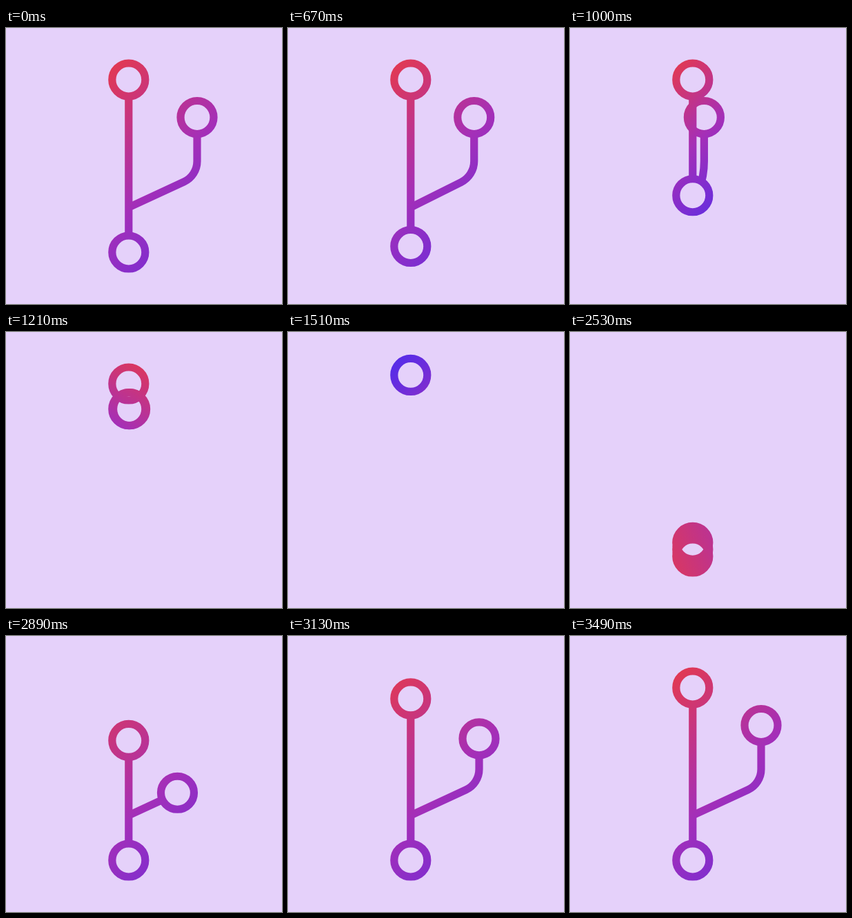
An HTML page with a canvas for the animation above (3520 ms loop, 400 px wide and 400 px high).

```html
<!DOCTYPE html>
<html lang="en">
<head>
<meta charset="utf-8">
<title>Branch loop</title>
<style>
  html, body { margin: 0; width: 100%; height: 100%; overflow: hidden; background: #e5d1fa; }
  canvas { display: block; width: 400px; height: 400px; }
</style>
</head>
<body>
<canvas id="stage" width="400" height="400"></canvas>
<script>
const LOOP = 3520, HOLD = 430, STEP = 30;
const X = 177.8, TOP = 75, BOTTOM = 325, RISE = 56;
const SIDE = { x: 277, y: 129.5 };
const JOINT = 260, CORNER = 214, BEND = 21, BEND_LENGTH = 38;
const R = 24, WIDTH = 11.2;
const BACKGROUND = '#e5d1fa';

// time, centre x, centre y, half length, angle in degrees
const GRADIENT = [
  [400, 240, 200, 170, 45],
  [670, 230, 190, 156, 45],
  [1000, 195, 155, 106, 45],
  [1500, 204, 164, 114, 225],
  [2050, 204, 164, 114, 225],
  [2800, 242, 202, 180, 405],
  [3490, 240, 200, 170, 405]
];

const canvas = document.getElementById('stage');
const ctx = canvas.getContext('2d');
const mix = (a, b, p) => a + (b - a) * p;
const clamp = v => Math.min(1, Math.max(0, v));

// Cubic bezier easing (.75, 0, .25, 1), solved by bisection.
function ease(u) {
  if (u <= 0 || u >= 1) return clamp(u);
  let lo = 0, hi = 1, s = 0.5;
  for (let i = 0; i < 24; i++) {
    s = (lo + hi) / 2;
    const x = 2.25 * s * (1 - s) ** 2 + 0.75 * s * s * (1 - s) + s ** 3;
    if (x < u) lo = s; else hi = s;
  }
  return s * s * (3 - 2 * s);
}
const progress = (t, start, end) => ease((t - start) / (end - start));

function ring(x, y, r = R) {
  if (r < 0.05) return;
  ctx.lineWidth = Math.min(WIDTH, r * 4);
  ctx.beginPath();
  ctx.arc(x, y, r, 0, Math.PI * 2);
  ctx.stroke();
}

function trunk(from, to) {
  if (to <= from) return;
  ctx.lineWidth = WIDTH;
  ctx.beginPath();
  ctx.moveTo(X, from);
  ctx.lineTo(X, to);
  ctx.stroke();
}

// The bend of a branch whose upright part stands at x.
function bend(x) {
  const dx = x - X, dy = CORNER - JOINT, len = Math.hypot(dx, dy);
  const at = d => [x - dx / len * d, CORNER - dy / len * d];
  const k = BEND * 0.39;
  return {
    straight: len - BEND,
    points: [at(BEND), at(k), [x, CORNER - k], [x, CORNER - BEND]]
  };
}

function branch(x, top, length = 999) {
  if (length <= 0) return;
  const [a, b, c, d] = bend(x).points;
  ctx.lineWidth = WIDTH;
  ctx.setLineDash([length, 999]);
  ctx.beginPath();
  ctx.moveTo(X, JOINT);
  ctx.lineTo(...a);
  ctx.bezierCurveTo(...b, ...c, ...d);
  ctx.lineTo(x, top);
  ctx.stroke();
  ctx.setLineDash([]);
}

const OUT = bend(SIDE.x);
const BRANCH_LENGTH = OUT.straight + BEND_LENGTH + CORNER - BEND - SIDE.y;

function pointOnBranch(d) {
  const p = OUT.points;
  if (d < OUT.straight) {
    const q = d / OUT.straight;
    return [mix(X, p[0][0], q), mix(JOINT, p[0][1], q)];
  }
  d -= OUT.straight;
  if (d < BEND_LENGTH) {
    const q = d / BEND_LENGTH, w = 1 - q;
    return [0, 1].map(i => w ** 3 * p[0][i] + 3 * w * w * q * p[1][i]
      + 3 * w * q * q * p[2][i] + q ** 3 * p[3][i]);
  }
  return [SIDE.x, CORNER - BEND - (d - BEND_LENGTH)];
}

function collapse(t) {
  const low = mix(BOTTOM, RISE, progress(t, 400, 1750));
  const r = R * (1 - progress(t, 1657, 2257));
  const top = Math.min(TOP, low);
  if (t < 1480) {
    const x = mix(SIDE.x, X, progress(t, 400, 1360));
    const y = Math.min(SIDE.y, low);
    trunk(top + R, low - R);
    if (low > SIDE.y + R) branch(x, y + R);

    // The lower ring swallows the lines it passes.
    ctx.globalCompositeOperation = 'destination-out';
    ctx.beginPath();
    ctx.arc(X, low, R, 0, Math.PI * 2);
    ctx.rect(0, low, 400, 400);
    ctx.fill();
    ctx.globalCompositeOperation = 'source-over';
    ring(X, top);
    ring(x, y);
  }
  ring(X, low, r);
}

function grow(t) {
  const r = R * progress(t, 1682, 2342);
  const top = mix(BOTTOM, TOP, progress(t, 2140, 3490));
  const stem = BOTTOM - JOINT;
  const d = (stem + BRANCH_LENGTH) * progress(t, 2270, 3473) - stem;
  const [x, y] = d < 0 ? [X, JOINT - d] : pointOnBranch(d);
  trunk(top + R, BOTTOM - R);
  branch(SIDE.x, SIDE.y, d - R);
  ring(X, top, r);
  ring(x, y, r);
  ring(X, BOTTOM, r);
}

function gradientAt(t) {
  const n = GRADIENT.length;
  let i = 0;
  while (i < n - 2 && t > GRADIENT[i + 1][0]) i++;
  const a = GRADIENT[i], b = GRADIENT[i + 1];
  const q = clamp((t - a[0]) / (b[0] - a[0]));
  const [, cx, cy, half, deg] = a.map((v, j) => mix(v, b[j], q));
  const dx = half * Math.cos(deg * Math.PI / 180);
  const dy = half * Math.sin(deg * Math.PI / 180);
  const g = ctx.createLinearGradient(cx - dx, cy - dy, cx + dx, cy + dy);
  g.addColorStop(0, '#e4394f');
  g.addColorStop(0.5, '#a42fb8');
  g.addColorStop(1, '#5a2ce6');
  return g;
}

function draw(t) {
  ctx.globalCompositeOperation = 'source-over';
  ctx.clearRect(0, 0, 400, 400);
  ctx.strokeStyle = ctx.fillStyle = '#000';
  if (t < 2257) collapse(t);
  if (t > 1682) grow(t);

  ctx.globalCompositeOperation = 'source-in';
  ctx.fillStyle = gradientAt(t);
  ctx.fillRect(0, 0, 400, 400);
  ctx.globalCompositeOperation = 'destination-over';
  ctx.fillStyle = BACKGROUND;
  ctx.fillRect(0, 0, 400, 400);
}

const begin = performance.now();
function tick() {
  const t = (performance.now() - begin) % LOOP;
  draw(t < HOLD ? 0 : HOLD + Math.floor((t - HOLD) / STEP) * STEP);
  requestAnimationFrame(tick);
}
tick();
</script>
</body>
</html>
```
